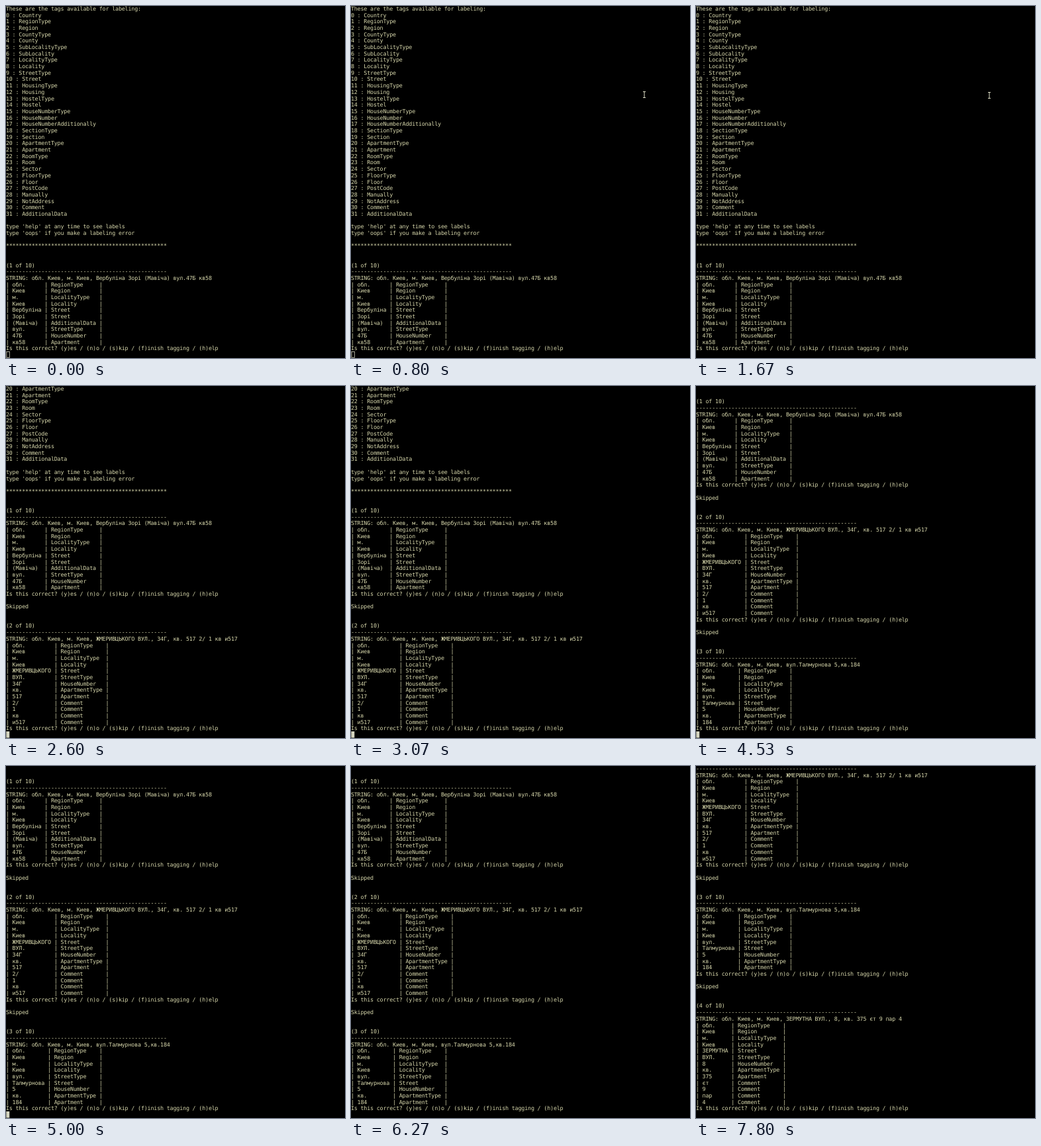
Animation of 512x532 px, one loop 8000 ms. Source, as an HTML page with a canvas:

```html
<!DOCTYPE html>
<html lang="uk">
<head>
<meta charset="utf-8">
<title>Address labeling</title>
<style>
html, body { margin: 0; width: 100%; height: 100%; overflow: hidden; background: #000; }
canvas { display: block; }
</style>
</head>
<body>
<canvas id="stage" width="512" height="532"></canvas>
<script>
const W = 512, H = 532, LOOP = 8000;
const CELL = 4.857, LINE = 9.69, BASE = 6.9, ROWS = 55;
const TEXT = '#d8d8ac', CURSOR = '#d6d6c0';
const FONT = '8.4px "DejaVu Sans Mono", monospace';

const tags = ('Country RegionType Region CountyType County SubLocalityType SubLocality ' +
  'LocalityType Locality StreetType Street HousingType Housing HostelType Hostel ' +
  'HouseNumberType HouseNumber HouseNumberAdditionally SectionType Section ' +
  'ApartmentType Apartment RoomType Room Sector FloorType Floor PostCode Manually ' +
  'NotAddress Comment AdditionalData').split(' ');

const records = [
  ['Вербуліна Зорі (Мавіча) вул.47Б кв58',
   'Вербуліна Зорі (Мавіча) вул. 47Б кв58',
   'Street Street AdditionalData StreetType HouseNumber Apartment'],
  ['ЖМЕРИВЦЬКОГО ВУЛ., 34Г, кв. 517 2/ 1 кв и517',
   'ЖМЕРИВЦЬКОГО ВУЛ. 34Г кв. 517 2/ 1 кв и517',
   'Street StreetType HouseNumber ApartmentType Apartment Comment Comment Comment Comment'],
  ['вул.Талмурнова 5,кв.184',
   'вул. Талмурнова 5 кв. 184',
   'StreetType Street HouseNumber ApartmentType Apartment'],
  ['ЗЕРМУТНА ВУЛ., 8, кв. 375 єт 9 пар 4',
   'ЗЕРМУТНА ВУЛ. 8 кв. 375 єт 9 пар 4',
   'Street StreetType HouseNumber ApartmentType Apartment Comment Comment Comment Comment']
];

const longest = list => Math.max(...list.map(s => s.length));

function table(words, labels) {
  const a = longest(words), b = longest(labels);
  return words.map((w, i) => `| ${w.padEnd(a)} | ${labels[i].padEnd(b)} |`);
}

const lines = [
  'These are the tags available for labeling:',
  ...tags.map((tag, i) => `${i} : ${tag}`),
  '',
  "type 'help' at any time to see labels",
  "type 'oops' if you make a labeling error",
  '',
  '*'.repeat(50)
];
const promptRows = [];
records.forEach(([address, words, labels], i) => {
  if (i) lines.push('', 'Skipped');
  lines.push('', '', `(${i + 1} of 10)`, '-'.repeat(50),
    'STRING: обл. Киев, м. Киев, ' + address,
    ...table(('обл. Киев м. Киев ' + words).split(' '),
      ('RegionType Region LocalityType Locality ' + labels).split(' ')),
    'Is this correct? (y)es / (n)o / (s)kip / (f)inish tagging / (h)elp');
  promptRows.push(lines.length);
});

const skips = [2600, 4400, 6870];
const blinks = [930, 1530, 2070, 3200, 3800, 5070, 5630, 6200, 6870, 7470];
const passed = (times, t) => times.filter(x => t >= x).length;

const ctx = document.getElementById('stage').getContext('2d');

// One cached screen of text per prompt, set on the terminal's cell grid.
const screens = promptRows.map(end => {
  const layer = document.createElement('canvas');
  layer.width = W;
  layer.height = H;
  const c = layer.getContext('2d');
  c.font = FONT;
  c.textAlign = 'center';
  c.textRendering = 'geometricPrecision';
  c.fillStyle = TEXT;
  lines.slice(end - ROWS + 1, end).forEach((line, row) => {
    [...line].forEach((ch, col) => {
      if (ch !== ' ') c.fillText(ch, (col + 0.5) * CELL, BASE + row * LINE);
    });
  });
  return layer;
});

function drawCursor(t) {
  const y = (ROWS - 1) * LINE - 1.3;
  if (t < blinks[0]) {
    ctx.strokeStyle = CURSOR;
    ctx.lineWidth = 0.8;
    ctx.strokeRect(0.9, y + 0.5, 4.4, 8.8);
  } else if (passed(blinks, t) % 2) {
    ctx.fillStyle = CURSOR;
    ctx.fillRect(0.4, y, CELL, 9.6);
  }
}

function drawPointer(t) {
  if (t < 70 || t >= skips[0]) return;
  const p = Math.min(1, (t - 70) / 800);
  const e = 1 - (1 - p) ** 2;
  const x = Math.round(497 - 54 * e), y = Math.round(-8 + 143 * e);
  ctx.fillStyle = '#dcdcc4';
  ctx.fillRect(x - 0.5, y - 4, 1, 8);
  ctx.fillRect(x - 2, y - 5, 4, 1);
  ctx.fillRect(x - 2, y + 4, 4, 1);
}

function frame(now) {
  const t = now % LOOP;
  ctx.fillStyle = '#000';
  ctx.fillRect(0, 0, W, H);
  ctx.drawImage(screens[passed(skips, t)], 0, 0);
  drawCursor(t);
  drawPointer(t);
  requestAnimationFrame(frame);
}
frame(performance.now());
</script>
</body>
</html>
```
